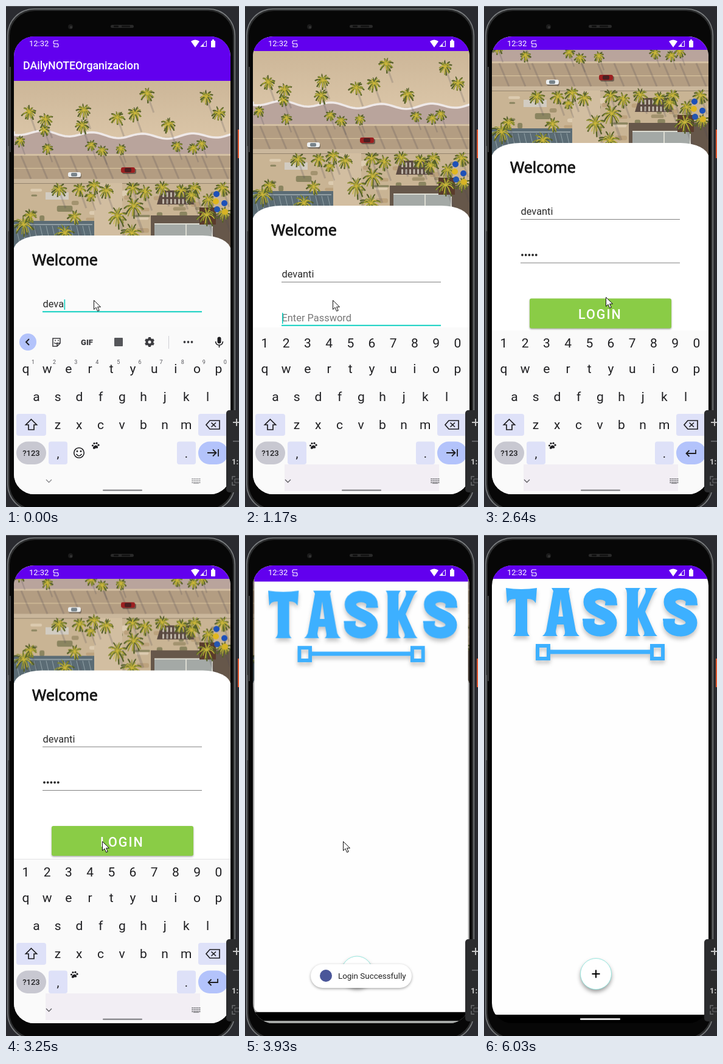
An HTML page with a canvas that plays this animation: 383x823 px, repeating every 6.13 s.

```html
<!DOCTYPE html>
<html lang="en">
<head>
<meta charset="utf-8">
<title>Login demo</title>
<style>
html, body { margin: 0; width: 100%; height: 100%; overflow: hidden; background: #2a2b30 }
canvas { display: block }
</style>
</head>
<body>
<canvas id="stage" width="383" height="823"></canvas>
<script>
const W = 383, H = 823, LOOP = 6130, PURPLE = '#6200ee', INK = '#1f1f22';
const USER = 'devanti', TITLE = 'DAilyNOTEOrganizacion';
// moments at which moving things take a new pose
const TICKS = [0, 950, 1070, 1170, 2540, 2640, 2760, 2880, 3010, 3130, 3250, 3360, 3470, 3580,
  3690, 3810, 3930, 4030, 4140, 4260, 4370, 4480, 4600, 4700, 4810, 4910, 5020, 5260, 5370,
  5480, 5600, 5710, 5820, 5920, 6030];
const PAN = [[0, 0], [950, -6], [1070, -32], [1170, -49], [2540, -105], [2640, -152], [3130, -154.5]];
const MOUSE_X = [[0, 144], [1170, 144], [2540, 174], [2640, 200], [3130, 158], [3690, 158], [3930, 161],
  [4480, 200], [4600, 212], [4810, 100], [5020, 26], [5260, 14]];
const MOUSE_Y = [[0, 483], [1170, 483], [2540, 480], [2640, 478], [3130, 503], [3930, 503],
  [4480, 640], [4600, 650], [4810, 776], [5020, 720], [5260, 690]];
const ZOOM = [[3810, .973], [3930, .987], [4030, .996], [4140, 1]];
const TOAST = [[3810, 0], [3930, 1], [5820, 1], [5920, .45], [6030, 0]];

let g = document.getElementById('stage').getContext('2d');

function track(keys, t) {
  if (t <= keys[0][0]) return keys[0][1];
  for (let i = 1; i < keys.length; i++) {
    const [a, u] = keys[i - 1], [b, v] = keys[i];
    if (t <= b) return u + (v - u) * (t - a) / (b - a);
  }
  return keys[keys.length - 1][1];
}

function box(x, y, w, h, fill, r = 0) {
  g.fillStyle = fill;
  g.beginPath();
  g.roundRect(x, y, w, h, r);
  g.fill();
}
function disc(x, y, r, fill) {
  g.fillStyle = fill;
  g.beginPath();
  g.arc(x, y, r, 0, 7);
  g.fill();
}
function line(d, color, width = 1.5) {
  g.strokeStyle = color;
  g.lineWidth = width;
  g.stroke(new Path2D(d));
}
function shape(d, fill) {
  g.fillStyle = fill;
  g.fill(new Path2D(d));
}
function text(s, x, y, font, fill = INK, align = 'left') {
  g.font = font;
  g.fillStyle = fill;
  g.textAlign = align;
  g.fillText(s, x, y);
}
function at(x, y, draw) {
  g.save();
  g.translate(x, y);
  draw();
  g.restore();
}
function shadow(color, blur, dy) {
  g.shadowColor = color;
  g.shadowBlur = blur;
  g.shadowOffsetY = dy;
}
function picture(w, h, draw) {
  const c = document.createElement('canvas'), old = g;
  c.width = w;
  c.height = h;
  g = c.getContext('2d');
  draw();
  g = old;
  return c;
}

let seed = 7;
const rnd = () => (seed = seed * 16807 % 2147483647) / 2147483647;

function palm(x, y, r) {
  for (const [color, k, width] of [['#555f2a', 1, 2.4], ['#8d9231', .9, 1.6], ['#cdb63c', .65, 1.2]])
    for (let i = 0; i < 9; i++) {
      const a = i * .7 + rnd() * .5, l = r * k * (.8 + rnd() * .35);
      const c = Math.cos(a) * l, s = Math.sin(a) * l;
      line(`M${x} ${y}Q${x + c * .6} ${y + s * .6 - r * .3} ${x + c} ${y + s + r * .12}`, color, width);
    }
}

// aerial beach street, drawn in page coordinates
const photo = picture(356, 274, () => {
  g.translate(-13, -123);
  const sand = g.createLinearGradient(0, 123, 0, 213);
  sand.addColorStop(0, '#ccb698');
  sand.addColorStop(1, '#dac5a7');
  box(13, 123, 356, 274, '#c9b494');
  box(13, 123, 356, 92, sand);
  let wave = 'M13 206';
  for (let x = 13; x <= 369; x += 4) wave += `L${x} ${211 + 4 * Math.sin(x / 13) - 3 * Math.cos(x / 80)}`;
  shape(wave + 'L369 246 13 246Z', '#b9a49c');
  line(wave, '#efe9e8', 3.5);
  box(13, 243, 356, 48, '#b39d82');
  box(13, 243, 356, 3, '#d3bfa2');
  box(13, 266, 356, 1.2, '#d6c19c');
  box(13, 284, 356, 7, '#cab79c');
  box(13, 291, 356, 1, '#94846d');
  for (let i = 0; i < 70; i++) {
    const x = 13 + rnd() * 356, y = 300 + rnd() * 90;
    box(x, y, 8 + rnd() * 18, 3 + rnd() * 7, ['#a3936f', '#8b8560', '#dccbb0', '#bca27d'][i % 4], 3);
  }
  box(65, 306, 38, 12, '#d2ccc2');
  box(145, 291, 46, 106, '#d2bea1');
  box(13, 353, 132, 44, '#5b6c75');
  for (let x = 16; x < 145; x += 10) line(`M${x} 361l7 30`, '#93a3a8', 1);
  line('M13 359H142', '#a5b1b4', 1.5);
  shape('M255 303H304L309 326H248Z', '#5c4b42');
  for (let i = 0; i < 14; i++) box(257 + i % 7 * 6.5, 306 + (i / 7 | 0) * 11, 3, 8, '#c2b9ac', 1);
  box(238, 344, 131, 53, '#66574a');
  box(244, 357, 95, 40, '#a4a9a6');
  line('M244 358H339V397M296 358V397', '#dcdcd2', 2);
  box(318, 331, 27, 28, '#5a3b2c');
  const small = [23, 222, 68, 234, 140, 229, 158, 238, 189, 235, 281, 230, 308, 234, 322, 227, 63, 204, 139, 313];
  const big = [232, 145, 329, 150, 350, 177, 128, 172, 183, 184, 38, 175, 65, 187, 125, 197, 212, 177, 267, 195,
    87, 302, 121, 302, 145, 296, 208, 300, 229, 306, 257, 299, 288, 304, 310, 300, 333, 319, 356, 300,
    113, 347, 40, 345, 358, 341, 165, 304, 305, 312];
  const large = [210, 330, 183, 346, 29, 360, 97, 374, 207, 374, 330, 344];
  const groups = [[small, 9], [big, 12], [large, 17]];
  for (const [list, r] of groups)
    for (let i = 0; i < list.length; i += 2)
      line(`M${list[i]} ${list[i + 1]}l${r * .9} ${r * 2.5}`, 'rgba(80,76,85,.22)', r / 4);
  for (let i = 0; i < 13; i++) line(`M${25 + i * 27} 246l16 38`, 'rgba(75,72,80,.2)', 3);
  for (const [list, r] of groups)
    for (let i = 0; i < list.length; i += 2) palm(list[i], list[i + 1], r);
  for (const [x, y, c] of [[346, 309, '#1d50b8'], [345, 321, '#e0b71f'], [359, 324, '#1d50b8'],
    [347, 334, '#2456b0'], [360, 338, '#d7b325']]) disc(x, y, 5, c);
  box(103, 275, 21, 8, 'rgba(40,40,40,.4)', 3);
  box(102, 273, 21, 8, '#edeff0', 3);
  box(107, 274, 10, 6, '#78838a', 2);
  box(191, 267, 23, 9, 'rgba(40,30,30,.5)', 3);
  box(189, 265, 23, 9, '#9c1f20', 3);
  box(195, 266, 11, 7, '#4a2022', 2);
});

// big heading lettering with its ruler
const heading = picture(W, 220, () => {
  const blue = '#3db0ff';
  const s = 'M209 114V110C209 93 173 92 173 110C173 128 209 126 209 144C209 162 172 161 172 144V139';
  shape('M36 87Q61 91 87 87L85 112Q81 104 71 105V157Q71 162 75 166H48Q52 162 52 157V105Q41 104 38 112Z', blue);
  shape('M111 87H141L139 92 151 158Q153 163 157 166H130Q134 163 133 158L131 147H120L118 158Q118 163 121 166H96Q100 163 102 158L114 92ZM126 105L122 134H130Z', blue);
  line(s, blue, 19);
  line('M199 114H219M162 139H182', blue, 3);
  shape('M232 87H257Q253 91 253 96V121L265 96Q267 91 264 87H285Q280 91 278 96L265 126 279 157Q281 163 285 166H261Q265 163 263 158L253 135V157Q253 162 257 166H232Q235 162 235 157V96Q235 91 232 87Z', blue);
  at(132, 0, () => {
    line(s, blue, 19);
    line('M199 114H219M162 139H182', blue, 3);
  });
  line('M108 192H274', blue, 7);
  line('M88 182H106V203H88ZM276 182H294V203H276Z', blue, 6);
});

function phone() {
  box(0, 0, W, H, '#2a2b30');
  box(0, 0, W, 1, '#5b5c60');
  box(2, 4, 375, 826, '#7b7e80', 44);
  box(3.5, 5.5, 372, 823, '#2b2c2d', 43);
  box(6, 8, 367, 818, '#070707', 41);
  line('M4 230V370M7 100V240', '#77797b', 1);
  box(381, 203, 2, 47, '#dc552d');
  box(172, 31, 38, 5, '#292929', 2.5);
  box(177, 32, 8, 3, '#111', 1);
  box(190, 32, 14, 3, '#151515', 1);
  disc(106, 34, 4, '#1c1c1c');
  disc(107, 35, 2, '#343434');
}

function sidePanel() {
  box(362, 664, 30, 135, '#2b2c2e', 5);
  line('M373 684H385M379 678V690', '#c6c6c6', 2);
  line('M373 715H385', '#606164', 2);
  text('1:1', 371, 753, '700 13px Roboto, sans-serif', '#c6c6c6');
  line('M372 778V773H377M372 782V787H377', '#6c6d70', 1.5);
  line('M376 777H390V783H376Z', '#6c6d70', 1);
}

function statusBar() {
  box(13, 50, 356, 22, PURPLE);
  text('12:32', 38, 66, '13px Roboto, sans-serif', '#fff');
  line('M86 57H80Q78 57 78 60T81 62H84Q86 62 86 65T83 67H79V64M78 62H86', '#fff', 1.2);
  shape('M304 58Q311 53 318 58L311 68Z', '#fff');
  line('M320 66.5L329.5 57V66.5Z', '#fff', 1);
  shape('M320 67L325 62V67Z', '#fff');
  box(337, 57, 7, 11, '#fff', 1);
  box(339, 55, 3, 2, '#fff');
}

function field(y, active) {
  box(60, active ? y - .8 : y, 262, active ? 2 : 1, active ? '#0fcfc0' : '#808080');
}

function loginPage(t, s) {
  const page = s < 1170 ? '#fbfbfb' : '#fff', pan = track(PAN, s);
  box(13, 50, 356, 753, page);
  at(0, pan, () => {
    box(13, 40, 356, 83, PURPLE);
    text(TITLE, 28, 104, '500 17.8px Roboto, sans-serif', '#fff');
    g.drawImage(photo, 13, 123);
    const corner = { x: 46, y: 23 };
    box(13, 377, 356, 80, page, [corner, corner, 0, 0]);
    text('Welcome', 43, 426, '500 25px "Noto Sans", sans-serif', '#151515');
    g.strokeStyle = '#151515';
    g.lineWidth = .8;
    g.strokeText('Welcome', 43, 426);

    const name = USER.slice(0, t < 100 ? 4 : t < 590 ? 5 : t < 710 ? 6 : 7);
    const body = '16.4px Roboto, sans-serif';
    text(name, 60.5, 495, body, '#2a2a2a');
    if (s < 950) box(61 + g.measureText(name).width, 482, 1.6, 17, '#0fcfc0');
    field(502, s < 950);

    const typed = [1410, 1630, 1870, 2080, 2300].filter(k => t >= k).length;
    const dots = t < 2540 ? Math.max(0, typed - 1) : 5, onPass = s >= 950 && s < 2540;
    for (let i = 0; i < dots; i++) disc(63 + i * 5.7, 561, 1.9, '#2a2a2a');
    let end = 61;
    if (!typed) text('Enter Password', 60.5, 567, body, '#777');
    else if (onPass) {
      text(typed, 60.5 + dots * 5.7, 567, body, '#2a2a2a');
      end += dots * 5.7 + 9;
    }
    if (onPass) box(end, 553, 1.6, 18, '#0fcfc0');
    field(573.5, onPass);

    const pressed = s >= 3580;
    const green = g.createLinearGradient(75, 0, 308, 0);
    green.addColorStop(0, pressed ? '#7ac62f' : '#8acc46');
    green.addColorStop(.4, pressed ? '#86ca3c' : '#8acc46');
    green.addColorStop(1, pressed ? '#78c52b' : '#8acc46');
    g.save();
    shadow('rgba(0,0,0,.35)', 3, 1.5);
    box(75, 632.5, 233, 49, green, 3);
    g.restore();
    g.letterSpacing = '2px';
    text('LOGIN', 155, 666, '500 21.5px Roboto, sans-serif', '#fff');
    g.letterSpacing = '0px';
  });
}

function row(chars, x, y) {
  [...chars].forEach((c, i) => text(c, x + i * 35.2, y, '21px Roboto, sans-serif', INK, 'center'));
}

function toolbar() {
  disc(36, 552, 14, '#b3c3fb');
  line('M38 547L33 552L38 557', INK, 2);
  line('M77 546H89V554L84 559H77ZM89 554H84V559', '#3c3c40', 1.6);
  line('M79 553Q82 556 85 553', '#3c3c40', 1.4);
  disc(81, 549.5, 1, '#3c3c40');
  disc(86, 549.5, 1, '#3c3c40');
  text('GIF', 133, 557, '900 13px Roboto, sans-serif', '#3c3c40', 'center');
  box(178, 545, 14, 14, '#55565a', 1);
  for (let i = 0; i < 6; i++) {
    const a = i * Math.PI / 3 + .52, c = Math.cos(a), n = Math.sin(a);
    line(`M${236 + c * 4} ${552 + n * 4}L${236 + c * 8} ${552 + n * 8}`, '#3c3c40', 4);
  }
  g.beginPath();
  g.arc(236, 552, 4.5, 0, 7);
  g.lineWidth = 4;
  g.stroke();
  box(267, 542, 1, 21, '#cfcfd3');
  for (let i = 0; i < 3; i++) disc(293.5 + i * 6, 552, 1.9, '#3c3c40');
  box(347.5, 543.5, 6, 11, INK, 3);
  line('M344.5 551Q345 557 350.5 557T356.5 551M350.5 557V561', INK, 1.6);
}

function keyboard(t, s) {
  const first = s < 950, top = s < 2540 ? 528 : s < 3250 ? 533 : 532;
  box(13, top, 356, 275, '#fafafa');
  if (s >= 3250) box(13, top, 356, 1, '#e2e2e4');
  if (first) {
    toolbar();
    [...'1234567890'].forEach((c, i) =>
      text(c, 44.5 + i * 35.1, 588, '9px Roboto, sans-serif', '#55555a', 'center'));
  } else row('1234567890', 32.5, 561);
  row('qwertyuiop', 32.5, 603);
  row('asdfghjkl', 50, 649);
  row('zxcvbnm', 85, 695);

  const pale = '#dee1f8';
  box(17, 670, 49, 36, pale, 4);
  line('M41.5 679L50.5 688H46V696H37V688H32.5Z', INK, 1.7);
  box(316, 670, 49, 36, pale, 4);
  line('M335 681H351V695H335L329 688ZM337.5 684.5L345 691.5M345 684.5L337.5 691.5', INK, 1.7);
  box(17, 715.5, 49, 37.5, '#c8c8d1', 19);
  text('?123', 41.5, 739, '500 13px Roboto, sans-serif', INK, 'center');
  box(70, 715.5, 31, 37.5, pale, 4);
  text(',', 85.5, 742, '20px Roboto, sans-serif', INK, 'center');
  box(281, 715.5, 31, 37.5, pale, 4);
  text('.', 296.5, 742, '20px Roboto, sans-serif', INK, 'center');
  box(316, 715.5, 49, 37.5, '#b3c3fb', 19);
  line(s < 2540 ? 'M331 734H345M340 728.5L345.5 734L340 739.5M349 728V740'
    : 'M348 729V735H333M337.5 730L332.5 735L337.5 740', INK, 1.8);

  if (first) {
    g.beginPath();
    g.arc(120, 734, 8.3, 0, 7);
    g.strokeStyle = INK;
    g.lineWidth = 1.6;
    g.stroke();
    disc(117, 731.5, 1.4, INK);
    disc(123, 731.5, 1.4, INK);
    line('M115.5 736Q120 742 124.5 736', INK, 1.6);
  }
  at(first ? 147 : 112, 722, () => {
    shape('M-4 5Q-5 2 0 -.5Q5 0 4 4Q2 5 1 4Q-2 7 -4 5Z', INK);
    for (const [x, y] of [[-4.5, 0], [-2, -3.5], [2, -3.8], [5, -.8]]) disc(x, y, 1.6, INK);
  });

  if (t >= 100) box(65, 753, 254, 44, '#f2eef4');
  const grey = t < 100 ? '#8a8a8e' : '#606064';
  line('M66 778L70.5 782.5L75 778', grey, 1.4);
  for (let i = 0; i < 15; i++) box(305.5 + i % 5 * 3, 776 + (i / 5 | 0) * 3, 1.8, 1.8, grey);
  box(308, 783.5, 9, 1, grey);
  box(159, 794.5, 65, 2, '#77777b', 1);
}

function tasksPage(s) {
  const z = track(ZOOM, s);
  g.save();
  g.globalAlpha = s < 3930 ? .6 : 1;
  g.translate(191, 427);
  g.scale(z, z);
  g.translate(-191, -427);
  box(13, 50, 356, 738, '#fefefe', 8);
  box(13, 50, 356, 22, PURPLE, [8, 8, 0, 0]);
  g.save();
  shadow('rgba(0,0,0,.22)', 6, 5);
  g.drawImage(heading, 0, 0);
  g.restore();
  g.save();
  shadow('rgba(0,0,0,.4)', 7, 4);
  disc(184, 721, 25.5, '#fff');
  g.restore();
  g.beginPath();
  g.arc(184, 721, 25.5, 0, 7);
  g.strokeStyle = '#7fe3d8';
  g.lineWidth = .8;
  g.stroke();
  line('M177.5 721H190.5M184 714.5V727.5', '#000', 2);
  g.restore();
}

function toast(alpha) {
  g.save();
  g.globalAlpha = alpha;
  g.save();
  shadow('rgba(0,0,0,.35)', 4, 1.5);
  box(108, 705, 166, 39, '#fff', 19.5);
  g.restore();
  disc(133, 724, 10, '#4a5699');
  text('Login Successfully', 153, 729, '13.4px Roboto, sans-serif', '#222');
  g.restore();
}

function mouse(x, y) {
  at(x, y, () => {
    const arrow = 'M.5 .5V15.5L4 12.2L6.6 18.3L9.2 17.2L6.6 11.3H11.5Z';
    shape(arrow, '#fff');
    line(arrow, '#111', 1);
  });
}

function draw(t) {
  const s = TICKS.filter(k => k <= t).pop();
  phone();
  g.save();
  g.beginPath();
  g.roundRect(13, 50, 356, 752, 33);
  g.clip();
  if (s < 3930) {
    loginPage(t, s);
    keyboard(t, s);
  } else if (s < 4140) {
    loginPage(t, s);
    box(13, 50, 356, 753, 'rgba(0,0,0,.35)');
    box(13, 784, 356, 14, '#000');
    box(13, 798, 356, 4, '#a5a8a6');
  } else {
    box(13, 50, 356, 753, '#000');
    box(158, 794, 66, 2.5, '#fff', 1);
  }
  if (s >= 3810) tasksPage(s);
  statusBar();
  const alpha = track(TOAST, s);
  if (alpha > 0) toast(alpha);
  g.restore();
  sidePanel();
  if (s < 5370) mouse(track(MOUSE_X, s), track(MOUSE_Y, s));
}

const start = performance.now();
function frame() {
  draw((performance.now() - start) % LOOP);
  requestAnimationFrame(frame);
}
frame();
</script>
</body>
</html>
```
